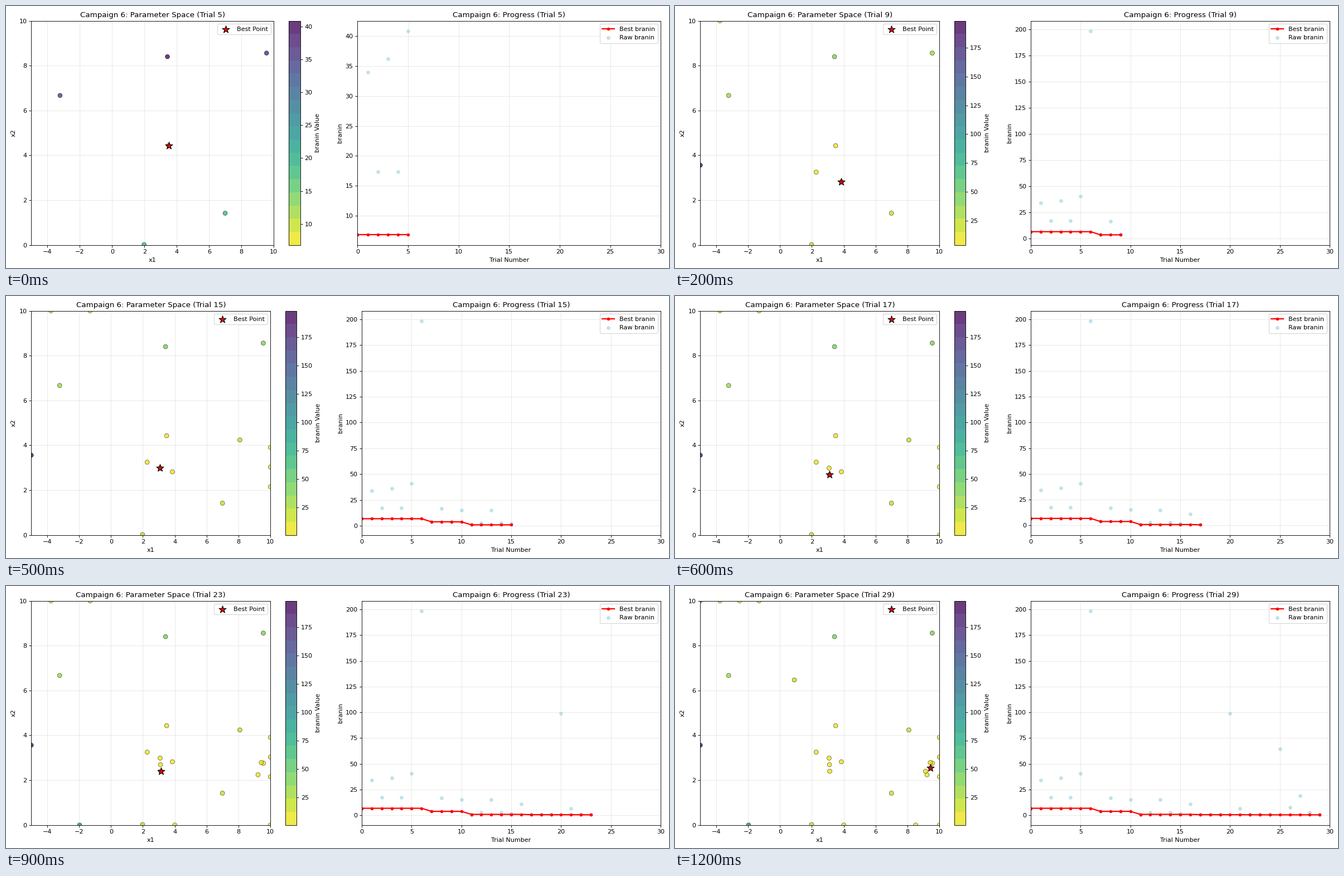
Write a matplotlib script that moves like this. It is 1189 by 471 pixels and loops after 1300 ms.

```python
import numpy as np
import matplotlib.pyplot as plt
from matplotlib.animation import FuncAnimation
from matplotlib.colors import ListedColormap

W, H, DPI = 1189, 471, 80
TOP, BOTTOM = 26.6, 429.7          # plot edges in pixels from the top
LEFT, RIGHT = 45.3, 1174.2
BANDS = 17


def branin(x, y):
    bowl = y - 5.1 / (4 * np.pi**2) * x**2 + 5 / np.pi * x - 6
    return bowl**2 + 10 * (1 - 1 / (8 * np.pi)) * np.cos(x) + 10


def search_path():
    """Scattered probes, sweeps of the edges and steps into the two valleys."""
    ring = np.radians([229, 65, 90, 194])
    moves = {
        "probe": iter([(3.49, 4.43), (-3.22, 6.67), (1.98, 0.02), (9.55, 8.56),
                       (6.99, 1.42), (3.42, 8.4), (-5, 3.56), (3.85, 2.82),
                       (2.27, 3.25), (8.08, 4.24), (10, 0), (9.44, 2.54),
                       (0.9, 6.47)]),
        "top": ((-5 + 1.23 * ((2 * j + 1) % 5), 10) for j in range(4)),
        "side": ((10, 2.15 + 0.88 * (2 * j % 3)) for j in range(3)),
        "floor": ((-1.97 + 6.7 * j - 0.73 * j**2, 0) for j in range(3)),
        "left": ((np.pi - 0.06 + 0.02 * j, 2.985 - 0.293 * j) for j in range(3)),
        "right": ((3 * np.pi + 0.31 * np.cos(a), 2.475 + 0.31 * np.sin(a))
                  for a in ring),
    }
    order = ("probe " * 8 + "top probe top left side probe side side probe left "
             "right right floor floor right left probe top floor probe top right")
    return np.array([next(moves[kind]) for kind in order.split()])


POINTS = search_path()
VALUES = branin(*POINTS.T)
BEST = np.minimum.accumulate(VALUES)
CMAP = ListedColormap(plt.get_cmap("viridis_r")((np.arange(BANDS) + 0.5) / BANDS))

plt.rcParams["font.family"] = "DejaVu Sans"
fig = plt.figure(figsize=(W / DPI, H / DPI), dpi=DPI)


def add_axes(x, width):
    return fig.add_axes((x / W, 1 - BOTTOM / H, width / W, (BOTTOM - TOP) / H))


def finish(ax, title, xlabel, ylabel):
    ax.set(title=title, xlabel=xlabel, ylabel=ylabel)
    ax.grid(True, alpha=0.3)
    ax.legend(loc="upper right")


def draw_space(trial, cell):
    ax = add_axes(LEFT, 0.8 * cell)
    cax = add_axes(LEFT + 0.85 * cell, (BOTTOM - TOP) / 20)
    x, y = POINTS[:trial + 1].T
    values = VALUES[:trial + 1]
    dots = ax.scatter(x, y, c=values, cmap=CMAP, s=50, alpha=0.8,
                      edgecolors="black", linewidths=0.5)
    best = values.argmin()
    ax.scatter(x[best], y[best], c="red", s=150, marker="*", edgecolors="black",
               linewidths=1, zorder=5, label="Best Point")
    ax.set(xlim=(-5, 10), ylim=(0, 10))
    fig.colorbar(dots, cax=cax, label="branin Value")
    finish(ax, f"Campaign 6: Parameter Space (Trial {trial})", "x1", "x2")


def draw_progress(trial, cell):
    ax = add_axes(RIGHT - cell, cell)
    trials = np.arange(trial + 1)
    values = VALUES[:trial + 1]
    ax.plot(trials, BEST[:trial + 1], "r-o", linewidth=2, markersize=4,
            label="Best branin")
    ax.scatter(trials, values, c="lightblue", s=25, alpha=0.7, label="Raw branin")
    margin = 0.05 * np.ptp(values)
    ax.set(xlim=(0, 30), ylim=(values.min() - margin, values.max() + margin))
    finish(ax, f"Campaign 6: Progress (Trial {trial})", "Trial Number", "branin")


def update(i):
    trial = 5 + 2 * i
    # Three-digit tick labels leave less room for the plots.
    cell = 536.2 if VALUES[:trial + 1].max() > 100 else 543.75
    fig.clear()
    draw_space(trial, cell)
    draw_progress(trial, cell)
    return []


anim = FuncAnimation(fig, update, frames=13, interval=100, repeat=True,
                     repeat_delay=0, blit=False)
plt.show()
```
